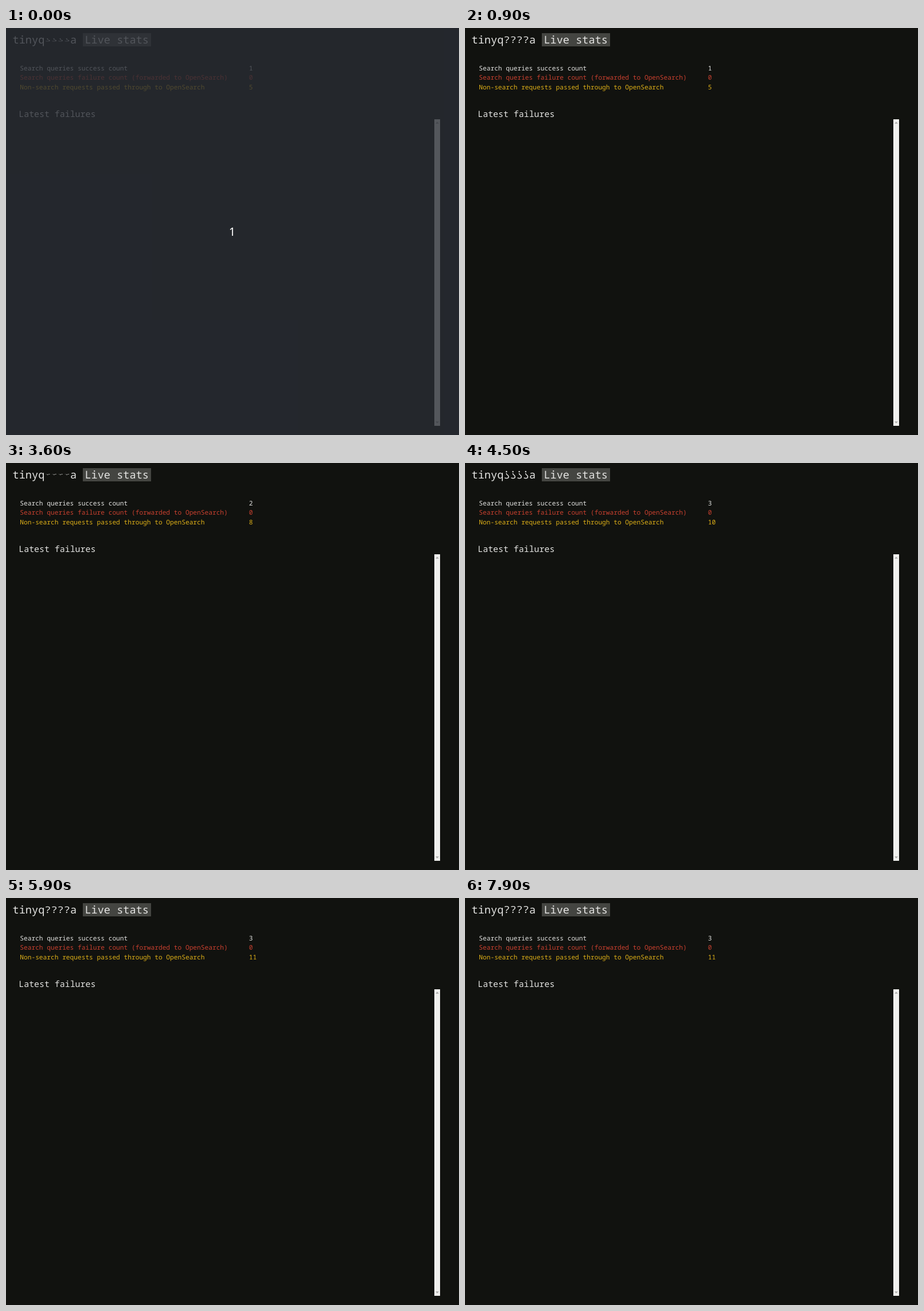
An HTML page that plays this animation: 790x709 px, repeating every 8000 ms.

```html
<!DOCTYPE html>
<html lang="en">
<head>
<meta charset="utf-8">
<title>Live stats</title>
<style>
  html, body { margin: 0; width: 100%; height: 100%; overflow: hidden; background: #11120f; }
  svg { display: block; width: 790px; height: 709px; }
  text { font-family: "Noto Sans Mono", "DejaVu Sans Mono", monospace; text-rendering: geometricPrecision; fill: #e4e4e2; }
  .head { font-size: 18.6px; }
  .sub { font-size: 14.9px; }
  .row text { font-size: 11.2px; }
  .fail text { fill: #c9402f; }
  .pass text { fill: #deb018; }
  .bar { fill: #f0f0ee; }
  .arrow { fill: #a3a3a3; }
  #countdown rect { fill: rgb(41, 45, 53); fill-opacity: .785; }
  #countdown text { font: 20px "Noto Sans", "Open Sans", sans-serif; fill: #fff; text-anchor: middle; }
</style>
</head>
<body>
<svg viewBox="0 0 790 709">
  <rect width="790" height="709" fill="#11120f"/>
  <g class="head">
    <text x="11.5" y="27">tinyq</text>
    <text id="marks" x="67.3" y="27">????</text>
    <text x="111.9" y="27">a</text>
    <rect x="134" y="9" width="119" height="23" fill="#444541"/>
    <text x="137.4" y="27">Live stats</text>
  </g>
  <g class="row">
    <text x="24.3" y="73.6">Search queries success count</text>
    <text id="success" x="423.7" y="73.6">1</text>
  </g>
  <g class="row fail">
    <text x="24.3" y="90.3">Search queries failure count (forwarded to OpenSearch)</text>
    <text x="423.7" y="90.3">0</text>
  </g>
  <g class="row pass">
    <text x="24.3" y="107">Non-search requests passed through to OpenSearch</text>
    <text id="passed" x="423.7" y="107">5</text>
  </g>
  <text class="sub" x="22.3" y="155.2">Latest failures</text>
  <rect class="bar" x="747" y="159" width="10" height="534"/>
  <path class="arrow" d="M749 166.5h6l-3-3zM749 685.5h6l-3 3z"/>
  <g id="countdown">
    <rect width="790" height="709"/>
    <text x="394.5" y="362">1</text>
  </g>
</svg>
<script>
  const LOOP = 8000, SPIN = 5000, SPIN_START = 1950, PIVOT = 20.3;
  // time, successes, passed-through requests
  const counts = [[0, 1, 5], [3000, 2, 8], [4000, 3, 10], [5000, 3, 11]];
  const [marks, success, passed, countdown] =
    ["marks", "success", "passed", "countdown"].map(id => document.getElementById(id));

  // CSS ease-in-out: cubic-bezier(.42, 0, .58, 1)
  function easeInOut(x) {
    let lo = 0, hi = 1, s = 0.5;
    for (let i = 0; i < 24; i++) {
      s = (lo + hi) / 2;
      const r = 1 - s;
      if (1.26 * r * r * s + 1.74 * r * s * s + s * s * s < x) lo = s; else hi = s;
    }
    return s * s * (3 - 2 * s);
  }

  function setText(el, value) {
    if (el.textContent !== String(value)) el.textContent = value;
  }

  function draw(t) {
    const phase = (t - SPIN_START + SPIN) % SPIN / SPIN;
    const flip = Math.cos(2 * Math.PI * easeInOut(phase));
    marks.setAttribute("transform", `matrix(1 0 0 ${flip.toFixed(5)} 0 ${(PIVOT * (1 - flip)).toFixed(4)})`);

    const [, ok, through] = counts.filter(c => c[0] <= t).pop();
    setText(success, ok);
    setText(passed, through);
    countdown.style.display = t < 100 ? "" : "none";
  }

  const start = performance.now();
  function tick() {
    draw((performance.now() - start) % LOOP);
    requestAnimationFrame(tick);
  }
  draw(0);
  requestAnimationFrame(tick);
</script>
</body>
</html>
```
